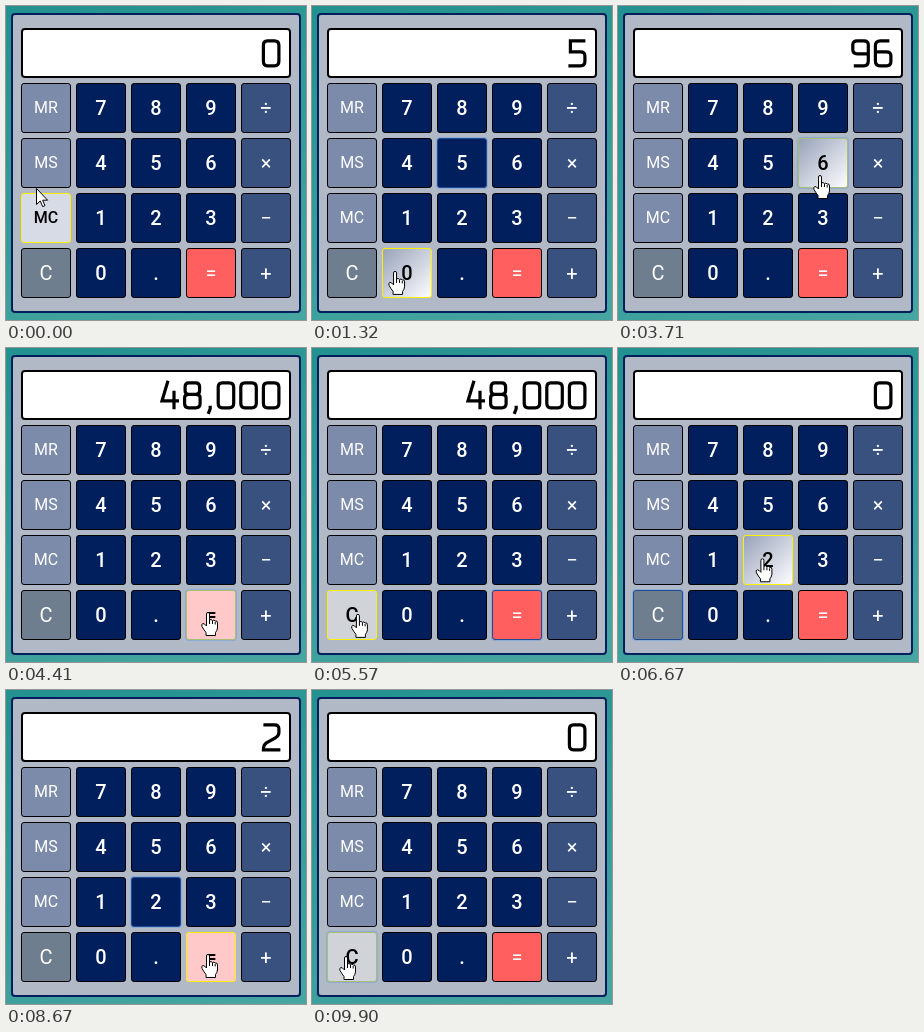
Animation, 300 px wide and 314 px high, one loop 9.98 s. Source, as an HTML page:

```html
<!DOCTYPE html>
<html lang="en">
<head>
<meta charset="utf-8">
<title>Calculator</title>
<style>
html, body { margin: 0; width: 100%; height: 100%; overflow: hidden; }
body { position: relative; background: linear-gradient(160deg, #22918f, #48a6a2); }
body * { box-sizing: border-box; }
.card {
  position: absolute; left: 5px; top: 7px; width: 290px; height: 300px;
  background: #b1b9c6; border: 2px solid #001f5b; border-radius: 4px;
}
.screen {
  position: absolute; left: 15px; top: 22px; width: 270px; height: 50px;
  background: #fff; border: 2px solid #000; border-radius: 4px;
}
.key {
  position: absolute; width: 50px; height: 50px; padding-bottom: 1px;
  display: flex; align-items: center; justify-content: center;
  border: 1px solid #000; border-radius: 3px;
  font: 400 20px Roboto, sans-serif; color: #fff;
}
.num { background: #001f5c; font-weight: 500; }
.mem { background: #7d8bab; font-size: 16px; }
.op { background: #39517f; }
.clear { background: #6e7e8e; }
.equals { background: #ff5f5f; }
.focus { border-color: #1f4a94; box-shadow: 0 0 0 1px rgba(90, 150, 230, .4); }
.hover { color: #000; font-weight: 500; border-color: #fff000; }
.hover.focus { border-color: #a9bf72; }
.num.hover { background: linear-gradient(135deg, #98a2b9, #fdfdff); }
.mem.hover { background: #d7dbe6; }
.op.hover { background: #bfc5d6; }
.clear.hover { background: #d0d4d8; }
.equals.hover { background: #ffc9c9; }
svg { position: absolute; left: 0; top: 0; width: 300px; height: 314px; }
#digits { fill: none; stroke: #000; stroke-width: 3.2; }
#cursor { fill: #fff; stroke: #000; stroke-width: 1; stroke-linejoin: round; }
</style>
</head>
<body>
<div class="card"></div>
<div class="screen"></div>
<svg id="readout" role="img"><g id="digits"></g></svg>
<div id="keys"></div>
<svg aria-hidden="true"><path id="cursor"/></svg>
<script>
const LOOP = 9980;
const HOLD = 70;    // mouse down to mouse up
const LAG = 70;     // hover follows the pointer late
const TRAVEL = 650; // longest move between keys
const START = { x: 30, y: 182 };
const $ = id => document.getElementById(id);

const GLYPHS = {
  0: 'M6 2H13Q17.5 2 17.5 6.5V22.5Q17.5 27 13 27H6Q2 27 2 22.5V6.5Q2 2 6 2Z',
  2: 'M2 2H13Q17.5 2 17.5 6V10Q17.5 13 14 15L5 20Q2 22 2 27H19',
  4: 'M8 0L2 20H19M14 10V28.5',
  5: 'M18 2H3V13H13Q17.5 13 17.5 17V23Q17.5 27 13 27H1',
  6: 'M16 2H7Q2 2 2 7V22Q2 27 6.5 27H13Q17.5 27 17.5 23V17Q17.5 13 13 13H2',
  8: 'M6 2H13Q17 2 17 6V10Q17 13.5 13 13.5H6Q2.5 13.5 2.5 10V6Q2.5 2 6 2ZM6 13.5Q2 13.5 2 17V23Q2 27 6 27H13Q17.5 27 17.5 23V17Q17.5 13.5 13 13.5',
  9: 'M3 27H13Q17.5 27 17.5 22V6Q17.5 2 13 2H6.5Q2 2 2 6V11Q2 15 6.5 15H17.5',
  ',': 'M5 25V28L3 33'
};
const ARROW = 'M.5.5V16.5L4.2 13 6.7 18.6 9 17.6 6.6 12.2H11.6Z';
const HAND = 'M-1.5 14V2Q-1.5 .5 0 .5T1.5 2V8Q3 6.8 4.5 8.5Q6 7.5 7.2 9Q9.5 8.3 9.5 11V16' +
  'Q9 19 7.5 20.5V23.5H-2V20.5Q-4 18 -6 14.5Q-7 12 -5 11.5Q-3.5 11.5 -1.5 14Z' +
  'M1.5 8V12M4.5 9V12M7.2 10V12.5';

function kind(label) {
  if (label === 'C') return 'clear';
  if (label === '=') return 'equals';
  if (label[0] === 'M') return 'mem';
  return /[\d.]/.test(label) ? 'num' : 'op';
}

const keys = 'MR 7 8 9 ÷ MS 4 5 6 × MC 1 2 3 − C 0 . = +'.split(' ').map((label, i) => {
  const x = 15 + i % 5 * 55, y = 77 + Math.floor(i / 5) * 55;
  const el = document.createElement('div');
  el.className = 'key ' + kind(label);
  el.textContent = label;
  el.style.left = x + 'px';
  el.style.top = y + 'px';
  $('keys').append(el);
  return { label, x, y, el };
});

const OPS = {
  '+': (a, b) => a + b, '−': (a, b) => a - b,
  '×': (a, b) => a * b, '÷': (a, b) => a / b
};
const calc = { shown: '0' };
function enter(label) {
  const { shown, held, op } = calc;
  if (label === 'C') calc.shown = '0';
  else if (label === '=') calc.shown = OPS[op](held, +shown).toLocaleString('en');
  else if (OPS[label]) Object.assign(calc, { held: +shown, op: label, shown: '0' });
  else calc.shown = shown === '0' ? label : shown + label;
  return calc.shown;
}

// key, pointer sets off, mouse down, where on the key
const presses = [
  ['5', 40, 710],
  ['0', 830, 1470, 13, 23],
  ['0', 1560, 1700, 13, 23],
  ['×', 1820, 2620, 11, 12],
  ['9', 2740, 3090],
  ['6', 3200, 3640, 22, 37],
  ['=', 3720, 4250],
  ['C', 5190, 6120, 19, 24],
  ['2', 6320, 6910],
  ['+', 7030, 7520, 27, 18],
  ['2', 7640, 8290],
  ['=', 8400, 8750],
  ['C', 8870, 9830, 19, 24]
].map(([label, leave, down, dx = 22, dy = 22]) => {
  const key = keys.find(k => k.label === label);
  return {
    label, leave, down, up: down + HOLD, shown: enter(label),
    arrive: Math.min(down - 100, leave + TRAVEL), x: key.x + dx, y: key.y + dy
  };
});

const latest = (phase, t) => presses.findLast(p => p[phase] <= t);

function pointAt(t) {
  const to = latest('leave', t);
  if (!to) return START;
  const from = presses[presses.indexOf(to) - 1] || START;
  const u = Math.min(1, (t - to.leave) / (to.arrive - to.leave));
  const e = 1 - (1 - u) ** 3;
  return { x: from.x + (to.x - from.x) * e, y: from.y + (to.y - from.y) * e };
}

const keyAt = ({ x, y }, slack = 0) =>
  keys.find(k => x >= k.x && x < k.x + 50 && y >= k.y - slack && y < k.y + 50);

let current;
function show(text) {
  if (text === current) return;
  current = text;
  $('readout').setAttribute('aria-label', text);
  let x = 278;
  $('digits').innerHTML = [...text].reverse().map(c => {
    x -= c === ',' ? 11 : 22.6;
    return `<path transform="translate(${x} 32.8)" d="${GLYPHS[c]}"/>`;
  }).join('');
}

function render(t) {
  const pos = pointAt(t), over = keyAt(pointAt(t - LAG), 5);
  const focus = latest('down', t)?.label;
  for (const k of keys) {
    k.el.classList.toggle('hover', k === over);
    k.el.classList.toggle('focus', k.label === focus);
  }
  show(latest('up', t)?.shown ?? '0');
  $('cursor').setAttribute('d', keyAt(pos) ? HAND : ARROW);
  $('cursor').setAttribute('transform', `translate(${pos.x.toFixed(2)} ${pos.y.toFixed(2)})`);
}

const start = performance.now();
function tick() {
  render((performance.now() - start) % LOOP);
  requestAnimationFrame(tick);
}
tick();
</script>
</body>
</html>
```
